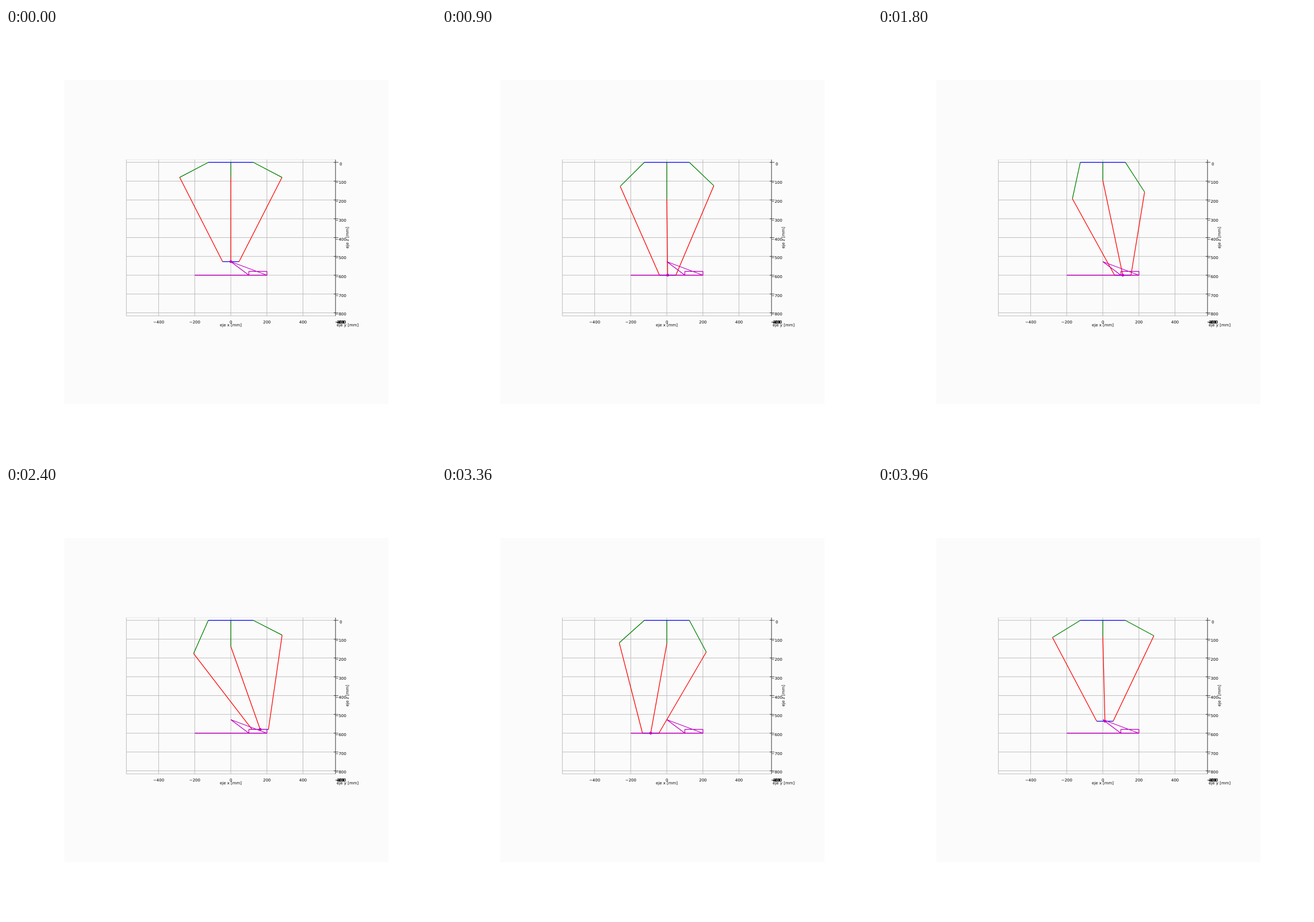
Animation, 748 px wide and 748 px high, one loop 4020 ms. Source, as an HTML page with a canvas:

```html
<!DOCTYPE html>
<html lang="es">
<head>
<meta charset="utf-8">
<title>Robot delta</title>
<style>
html, body { margin: 0; width: 100%; height: 100%; overflow: hidden; background: #fff; }
canvas { display: block; width: 748px; height: 748px; }
</style>
</head>
<body>
<canvas id="stage" width="748" height="748"></canvas>
<script>
const ctx = document.getElementById('stage').getContext('2d');
const STEP = 60, COUNT = 67;

// robot geometry in mm
const BASE = 144.2, PLATE = 52.5, UPPER = 200, LOWER = 525.8;
const HOME = -528, FLOOR = -600, LIFT = -580;
const C30 = Math.sqrt(3) / 2;
const ARMS = [[-C30, -0.5], [C30, -0.5], [0, 1]];

const BLUE = '#0000ff', GREEN = '#008000', RED = '#ff0000', MAGENTA = '#bf00bf';

const px = x => 391.1 + x * 0.3138;
const pz = z => 233.7 - z * 0.3272;

function line(points, color, width) {
  ctx.strokeStyle = color;
  ctx.lineWidth = width;
  ctx.beginPath();
  points.forEach(([x, y], i) => i ? ctx.lineTo(x, y) : ctx.moveTo(x, y));
  ctx.stroke();
}

const plot = (points, color, width = 1.25) =>
  line(points.map(([x, z]) => [px(x), pz(z)]), color, width);

function label(str, x, y) {
  ctx.fillText(str, x, y + 2.5);
}

// tool path: each leg has a duration in steps and a position for u in 0..1
const mix = (a, b) => u => a.map((v, i) => v + (b[i] - v) * u);
const circle = r => u => {
  const a = -2 * Math.PI * u;
  return [r * Math.cos(a), r * Math.sin(a), FLOOR];
};
const LEGS = [
  [8.81, mix([0, 0, HOME], [200, 0, FLOOR])],
  [25.13, circle(200)],
  [2.12, mix([200, 0, FLOOR], [200, 0, LIFT])],
  [10.61, mix([200, 0, LIFT], [100, 0, LIFT])],
  [2.12, mix([100, 0, LIFT], [100, 0, FLOOR])],
  [12.57, circle(100)],
  [5.25, mix([100, 0, FLOOR], [0, 0, HOME])]
];

function toolAt(n) {
  for (const [len, at] of LEGS) {
    if (n <= len) return at(n / len);
    n -= len;
  }
  return [0, 0, HOME];
}

// inverse kinematics of one arm, solved in its own vertical plane
function elbow([ux, uy], [x, y, z]) {
  const side = uy * x - ux * y;
  const dr = PLATE + x * ux + y * uy - BASE;
  const d2 = dr * dr + z * z;
  const reach2 = LOWER * LOWER - side * side;
  const cos = (UPPER * UPPER + d2 - reach2) / (2 * UPPER * Math.sqrt(d2));
  const a = Math.atan2(-z, dr) - Math.acos(cos);
  return [(BASE + UPPER * Math.cos(a)) * ux, -UPPER * Math.sin(a)];
}

function drawAxes() {
  const left = 209.4, right = 573.2, top = 229, bottom = 500.8;
  const grid = '#b8b8b8';
  ctx.fillStyle = '#fff';
  ctx.fillRect(0, 0, 748, 748);
  ctx.fillStyle = '#fbfbfb';
  ctx.fillRect(101.5, 90.5, 564, 564);

  line([[left, top], [right, top]], '#e6e6e6', 0.9);
  line([[left, top], [left, bottom], [right, bottom]], grid, 0.9);
  ctx.fillStyle = '#000';
  ctx.font = '6.94px "DejaVu Sans", sans-serif';
  ctx.textAlign = 'center';

  const num = v => String(v).replace('-', '\u2212');
  for (let v = -400; v <= 400; v += 200) {
    line([[px(v), top], [px(v), bottom]], grid, 0.9);
    label(num(v), px(v), 511.2);
    label(num(v), 582, 511.2);
  }
  for (let v = 0; v >= -800; v -= 100) {
    const y = pz(v);
    line([[left, y], [right, y]], grid, 0.9);
    line([[570, y], [578.3, y]], '#222', 0.8);
    label(num(v), 582.4, y + 2.5);
  }
  line([[right, top], [right, bottom]], '#222', 0.9);

  label('eje x [mm]', 391, 516.2);
  label('eje y [mm]', 594.3, 516.2);
  ctx.save();
  ctx.translate(593.3, 364.7);
  ctx.rotate(-Math.PI / 2);
  label('eje z [mm]', 0, 0);
  ctx.restore();
}

function drawRobot(tool) {
  const [x, , z] = tool;
  const b = BASE * C30, p = PLATE * C30;
  plot([[-b, 0], [b, 0]], BLUE);
  plot([[x - p, z], [x + p, z]], BLUE);
  const joints = ARMS.map(u => elbow(u, tool));
  ARMS.forEach((u, i) => plot([[u[0] * BASE, 0], joints[i]], GREEN));
  ARMS.forEach((u, i) => plot([joints[i], [x + u[0] * PLATE, z]], RED));
}

function drawPath([x, , z]) {
  plot([[0, HOME], [200, FLOOR], [200, LIFT], [100, LIFT], [100, FLOOR], [0, HOME]], MAGENTA);
  plot([[-200, FLOOR], [200, FLOOR]], MAGENTA, 1.5);
  ctx.fillStyle = MAGENTA;
  ctx.beginPath();
  ctx.arc(px(x), pz(z), 2.4, 0, 2 * Math.PI);
  ctx.fill();
}

function frame(now) {
  const tool = toolAt(Math.floor(now / STEP) % COUNT);
  drawAxes();
  drawRobot(tool);
  drawPath(tool);
  requestAnimationFrame(frame);
}

ctx.lineJoin = 'round';
frame(0);
</script>
</body>
</html>
```
